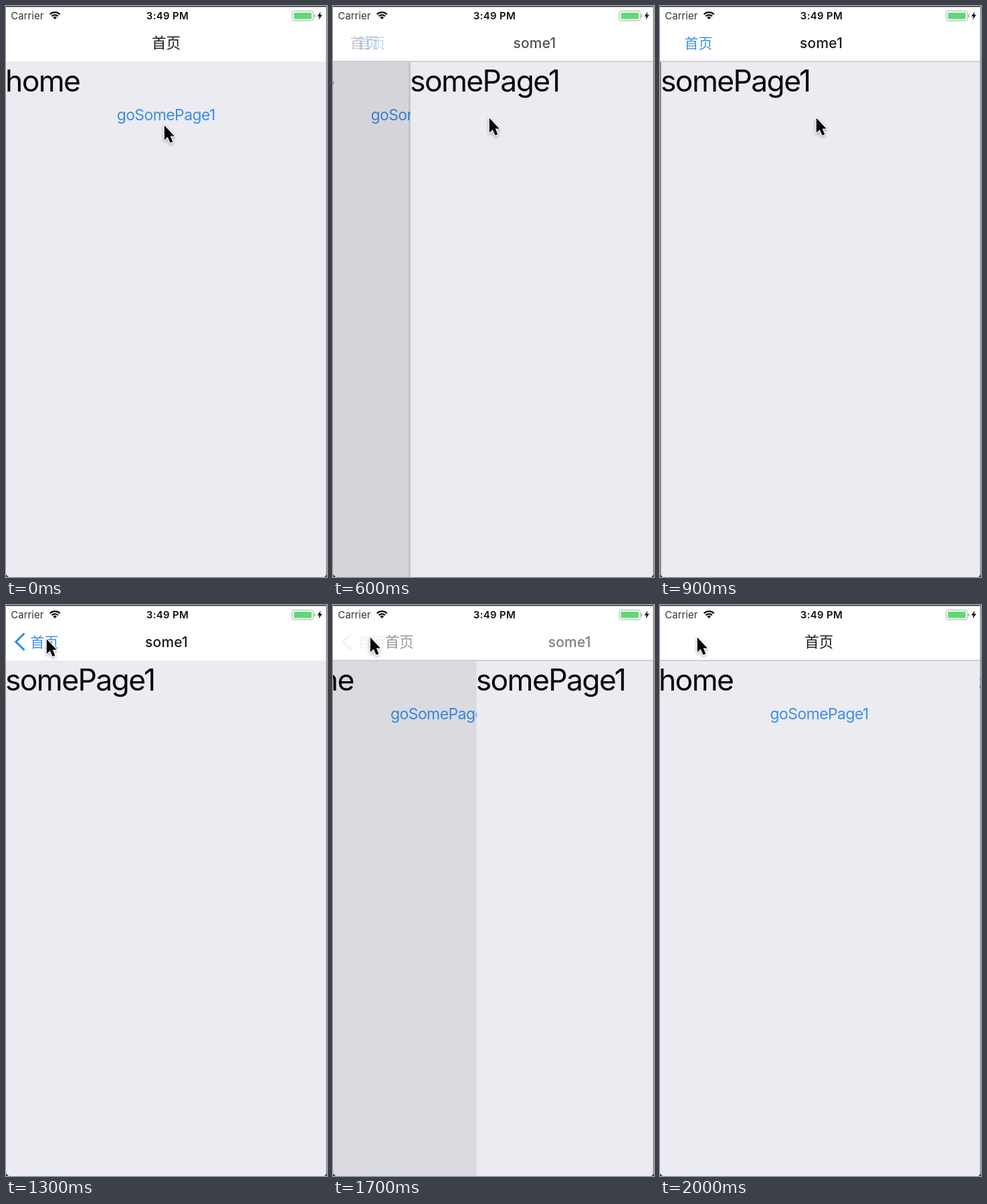
Recreate the animation shown at these times as an HTML page with a canvas. Size 480 by 854 pixels, loop 2.1 s.

```html
<!DOCTYPE html>
<html lang="zh">
<head>
<meta charset="utf-8">
<title>Navigation</title>
<style>
html, body { margin: 0; width: 100%; height: 100%; overflow: hidden; background: #fff; }
canvas { display: block; width: 480px; height: 854px; }
</style>
</head>
<body>
<canvas id="stage" width="480" height="854"></canvas>
<script>
const ctx = document.getElementById('stage').getContext('2d');
const W = 480, H = 854, BAR = 83, LOOP = 2100, STEP = 100;
const LATIN = 'Inter, "Liberation Sans", sans-serif';
const HAN = '"Noto Sans CJK SC", "Noto Sans CJK", sans-serif';
const PAGE = '#ecebf2', BLUE = '#3a8fe8';

const clamp = v => Math.max(0, Math.min(1, v));
const mix = (a, b, k) => a + (b - a) * k;
const smooth = k => k * k * (3 - 2 * k);

// Critically damped spring, 0 to 1
function spring(t, start, rate) {
  const u = Math.max(0, t - start) / 1000 * rate;
  return 1 - (1 + u) * Math.exp(-u);
}

// How far the second page covers the first
function cover(t) {
  if (t < 1600) return t >= 1000 ? 1 : spring(t, 432, 16.3);
  return 1 - spring(t, 1617, 18.26);
}

const path = [
  [0, 236.8, 178.5], [300, 233.8, 167.5], [900, 233.8, 167.5],
  [1300, 60.8, 51], [1500, 55.8, 48.5], [LOOP, 55.8, 48.5]
];
function pointer(t) {
  const i = path.findIndex(p => p[0] > t);
  const a = path[i - 1], b = path[i];
  const k = smooth((t - a[0]) / (b[0] - a[0]));
  return [mix(a[1], b[1], k), mix(a[2], b[2], k)];
}

function rect(x, y, w, h, color) {
  ctx.fillStyle = color;
  ctx.fillRect(x, y, w, h);
}

function text(str, x, y, font, color, { align = 'left', gap = 0, alpha = 1 } = {}) {
  ctx.save();
  ctx.font = font;
  ctx.letterSpacing = gap + 'px';
  ctx.textAlign = align;
  ctx.fillStyle = color;
  ctx.globalAlpha = clamp(alpha);
  ctx.fillText(str, x, y);
  ctx.restore();
}

function poly(points, x = 0, y = 0) {
  ctx.beginPath();
  points.forEach(([px, py]) => ctx.lineTo(x + px, y + py));
}

function heading(str, x) {
  text(str, x, 128, '44.5px ' + LATIN, '#080808', { gap: -1.65 });
}

function pages(t, p) {
  const edge = W * (1 - p), home = -0.3 * W * p;
  rect(0, 0, W, H, PAGE);
  if (p < 1) {
    heading('home', home - 1);
    text('goSomePage1', home + 239.2, 171, '23px ' + LATIN, BLUE, { align: 'center', gap: -0.6 });
    rect(0, BAR, edge, H - BAR, `rgba(0,0,0,${0.13 * p})`);
  }
  if (p > 0) {
    rect(edge, BAR, W - edge, H - BAR, PAGE);
    heading('somePage1', edge - 1);
    if (t < 1000) {
      rect(edge - 3, BAR, 3, H - BAR, 'rgba(0,0,0,.07)');
      if (edge < 4) rect(0, BAR, 1.3, H - BAR, '#77777b');
    }
  }
}

function navBar(t, p) {
  rect(0, 0, W, BAR, '#fff');
  if (p > 0 && p < 1) rect(0, 82, W, 1.6, '#cacace');
  const title = '500 21.5px ' + HAN;
  text('首页', 239.5 - 254 * p, 63, title, '#1a1a1a', { align: 'center', alpha: 1 - p });
  text('首页', 57.5, 63, '21px ' + HAN, BLUE, { align: 'center', alpha: p ** 4 });
  text('some1', 240 + 254 * (1 - p), 63, '500 21px ' + LATIN, '#1a1a1a',
    { align: 'center', gap: 0.2, alpha: p });

  if (t >= 1000) {
    ctx.save();
    ctx.globalAlpha = p ** 4;
    ctx.strokeStyle = '#2b87ec';
    ctx.lineWidth = 3;
    poly([[27.5, 42.5], [14.8, 55], [27.5, 67.5]]);
    ctx.stroke();
    ctx.restore();
  }
}

function wifi(x, y) {
  const from = -Math.PI * 0.75, to = -Math.PI * 0.25;
  ctx.strokeStyle = ctx.fillStyle = '#111';
  ctx.lineWidth = 2.3;
  for (const r of [6.7, 10.6]) {
    ctx.beginPath();
    ctx.arc(x, y, r, from, to);
    ctx.stroke();
  }
  ctx.beginPath();
  ctx.moveTo(x, y);
  ctx.arc(x, y, 4, from, to);
  ctx.fill();
}

function roundBox(x, y, w, h, r) {
  ctx.beginPath();
  ctx.roundRect(x, y, w, h, r);
}

function battery() {
  ctx.strokeStyle = '#b8cbbc';
  ctx.lineWidth = 1.4;
  roundBox(428, 7.5, 31.5, 14.5, 3.5);
  ctx.stroke();
  ctx.fillStyle = '#62d877';
  roundBox(430.5, 10, 26.5, 9.5, 1.5);
  ctx.fill();
  ctx.fillStyle = '#a5aaa7';
  roundBox(460.7, 12.3, 1.6, 5, 0.8);
  ctx.fill();
  ctx.fillStyle = '#151515';
  poly([[470.5, 8.5], [465.5, 15.5], [468.5, 15.5], [467.5, 20.5], [473, 13.3], [469.8, 13.3]]);
  ctx.fill();
}

function statusBar() {
  text('Carrier', 7.3, 20, '15px ' + LATIN, '#333');
  wifi(73.2, 20);
  text('3:49 PM', 241.5, 20, '600 15px ' + LATIN, '#111', { align: 'center', gap: 0.3 });
  battery();
}

function bezel() {
  rect(0, 0, W, 1.4, '#2c2c2e');
  rect(478.6, 0, 1.4, H, '#88888d');
  ctx.fillStyle = '#444';
  poly([[0, H - 4], [4, H], [0, H]]);
  ctx.fill();
  poly([[W, H - 4], [W - 4, H], [W, H]]);
  ctx.fill();
}

const arrow = [[0, 0], [0, 22], [5, 17.5], [8.7, 26], [12.6, 24.4], [9, 16], [15, 16]];
function cursor([x, y]) {
  ctx.save();
  ctx.lineJoin = 'round';
  poly(arrow, x, y);
  ctx.closePath();
  ctx.shadowColor = 'rgba(0,0,0,.35)';
  ctx.shadowBlur = 4;
  ctx.shadowOffsetY = 2;
  ctx.strokeStyle = '#fff';
  ctx.lineWidth = 2.2;
  ctx.stroke();
  ctx.shadowColor = 'transparent';
  ctx.fillStyle = '#050505';
  ctx.fill();
  ctx.restore();
}

function draw(t) {
  const p = cover(t);
  pages(t, p);
  navBar(t, p);
  statusBar();
  bezel();
  cursor(pointer(t));
}

const begin = performance.now();
function tick() {
  const t = (performance.now() - begin) % LOOP;
  draw(Math.floor(t / STEP) * STEP);
  requestAnimationFrame(tick);
}
tick();
</script>
</body>
</html>
```
